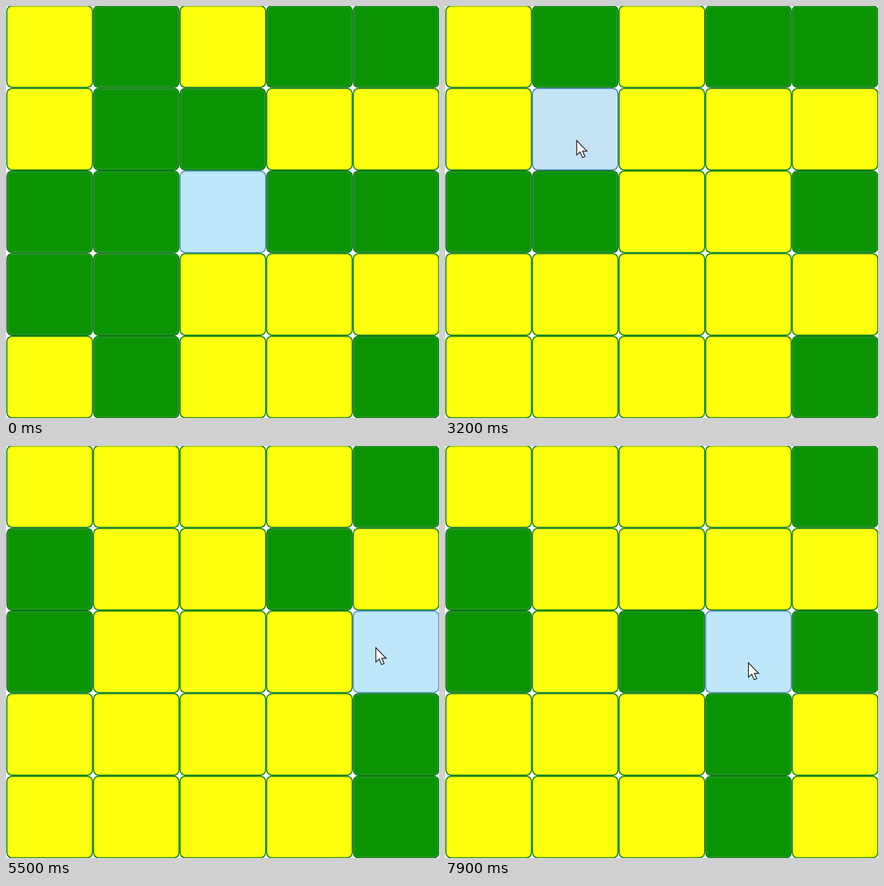
Write an HTML page with a canvas that moves like this. It is 600x571 px and loops after 8000 ms.

```html
<!DOCTYPE html>
<html lang="en">
<head>
<meta charset="utf-8">
<title>Lights puzzle</title>
<style>
html, body { margin: 0; width: 100%; height: 100%; overflow: hidden; background: #fff; }
canvas { display: block; }
</style>
</head>
<body>
<canvas id="stage" width="600" height="571"></canvas>
<script>
const ctx = document.getElementById('stage').getContext('2d');
const LOOP = 8000, CELL_W = 120, CELL_H = 114.5, LEFT = 0.5, TOP = -1;
const PRESS = 150, REST = 250, TRAVEL = 500; // button held, pause before release, glide time
const START = ['10100', '10011', '00000', '00111', '10110'];

const click = (time, x, y) => ({ time, x, y });
const CLICKS = [
  click(1450, 281, 307), click(2500, 184, 408), click(3300, 182, 186), click(4400, 392, 185),
  click(5200, 512, 279), click(6300, 516, 484), click(7700, 420, 300)
];

const cellAt = ({ x, y }) => [Math.floor((y - TOP) / CELL_H), Math.floor((x - LEFT) / CELL_W)];

// The pointer waits where it last clicked, then glides to the next place
function pointerAt(t) {
  let { x, y } = CLICKS[0];
  for (const next of CLICKS) {
    const k = Math.min(1, Math.max(0, (t - next.time + REST + TRAVEL) / TRAVEL));
    const ease = k * k * (3 - 2 * k);
    x += (next.x - x) * ease;
    y += (next.y - y) * ease;
  }
  return { x, y };
}

// Each click flips its cell and the four neighbours
function boardAt(t) {
  const board = START.map(row => [...row].map(Number));
  for (const done of CLICKS.filter(c => c.time <= t)) {
    const [row, col] = cellAt(done);
    board.forEach((line, r) => line.forEach((_, c) => {
      if (Math.abs(r - row) + Math.abs(c - col) < 2) line[c] ^= 1;
    }));
  }
  return board;
}

function drawCell(r, c, fill, border, rim = fill) {
  const layer = (inset, color) => {
    ctx.beginPath();
    ctx.roundRect(LEFT + c * CELL_W + inset, TOP + r * CELL_H + inset,
      CELL_W - 2 * inset, CELL_H - 2 * inset, 8 - inset);
    ctx.fillStyle = color;
    ctx.fill();
  };
  layer(0, border);
  layer(1.5, rim);
  layer(2.5, fill);
}

const ARROW = new Path2D('M0 0V20L4.6 15.8L8 23.5L11.4 22L8.2 14.6H14.2Z');

function drawPointer({ x, y }) {
  ctx.save();
  ctx.translate(x + 0.5, y + 0.5);
  ctx.fillStyle = '#fff';
  ctx.fill(ARROW);
  ctx.strokeStyle = '#222';
  ctx.lineWidth = 1.2;
  ctx.stroke(ARROW);
  ctx.restore();
}

function draw(t) {
  const pointer = pointerAt(t), [hoverRow, hoverCol] = cellAt(pointer);
  const pressed = CLICKS.some(({ time }) => t >= time - PRESS && t < time);
  ctx.fillStyle = '#fff';
  ctx.fillRect(0, 0, 600, 571);
  boardAt(t).forEach((line, r) => line.forEach((lit, c) => {
    if (r === hoverRow && c === hoverCol)
      drawCell(r, c, pressed ? '#c5e3f5' : '#bee7fa', pressed ? '#3f7fae' : '#5590c4');
    else if (lit) drawCell(r, c, '#fdff0c', '#0a7f1c');
    else drawCell(r, c, '#0a9404', '#06780f', '#36a035');
  }));
  if (t >= 100) drawPointer(pointer);
}

const began = performance.now();
function tick() {
  draw((performance.now() - began) % LOOP);
  requestAnimationFrame(tick);
}
tick();
</script>
</body>
</html>
```
